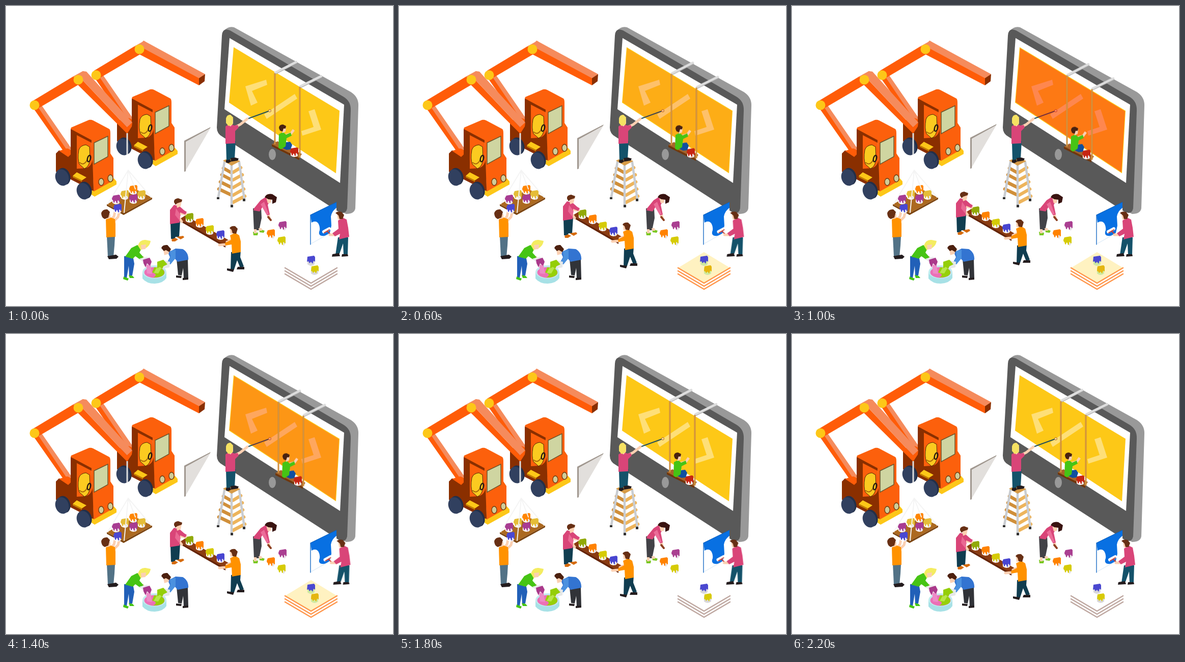
These frames come from a looping animation (760 by 590 pixels, 2400 ms). An HTML page:

```html
<!DOCTYPE html>
<html lang="en">
<head>
<meta charset="utf-8">
<title>Screen painting crew</title>
<style>
  html, body { margin: 0; width: 100%; height: 100%; overflow: hidden; background: #fff; }
  svg { display: block; width: 760px; height: 590px; }
  .o { fill: #ff5c08 } .br { fill: #8a2f00 } .sal { fill: #f58b5c } .y { fill: #fdc718 }
  .skin { fill: #fbd0b2 } .pink { fill: #d94578 } .teal { fill: #14526a } .navy { fill: #103d50 }
  .hair { fill: #672f14 } .dark { fill: #241c1e } .amber { fill: #ff9200 } .leaf { fill: #46c414 }
  .line { fill: none; stroke-linecap: round; stroke-linejoin: round }
  .arm { stroke: #fbd0b2; stroke-width: 5 }
  .lift, .swing, .panel, .roller, .tint, .on, .off { animation: 2400ms step-end infinite }
  .lift { animation-name: lift }
  .swing { animation-name: swing }
  .panel { animation-name: panel }
  .roller { animation-name: roller }
  .tint { animation-name: tint }
  .on { animation-name: on }
  .off { animation-name: off }
  @keyframes lift {
    0%, 91.66%, 100% { transform: translateY(0) }
    8.33% { transform: translateY(-2px) }
    16.66% { transform: translateY(-4px) }
    25% { transform: translateY(-7px) }
    33.33% { transform: translateY(-9px) }
    41.66% { transform: translateY(-13px) }
    58.33% { transform: translateY(-10px) }
    66.66% { transform: translateY(-8px) }
    75% { transform: translateY(-5px) }
    83.33% { transform: translateY(-3px) }
  }
  @keyframes swing {
    0%, 91.66%, 100% { transform: none }
    8.33%, 83.33% { transform: translate(2px, 0) }
    16.66%, 75% { transform: translate(4px, 0) }
    25%, 58.33% { transform: translate(7px, 1.5px) }
    33.33% { transform: translate(9px, 3px) }
    41.66% { transform: translate(12px, 4.5px) }
    66.66% { transform: translate(5px, 1px) }
  }
  @keyframes panel {
    0%, 91.66%, 100% { transform: translateY(0) }
    8.33%, 83.33% { transform: translateY(-2px) }
    16.66%, 75% { transform: translateY(-4px) }
    25%, 66.66% { transform: translateY(-5px) }
    33.33%, 41.66%, 58.33% { transform: translateY(-6px) }
  }
  @keyframes roller {
    0%, 91.66%, 100% { transform: translateX(0) }
    8.33%, 83.33% { transform: translateX(1px) }
    16.66%, 33.33%, 58.33%, 75% { transform: translateX(2.5px) }
    25%, 66.66% { transform: translateX(3.5px) }
    41.66% { transform: translateX(-3px) }
  }
  @keyframes tint {
    0%, 75%, 100% { opacity: 0 }
    25%, 66.66% { opacity: .13 }
    33.33%, 58.33% { opacity: .25 }
    41.66% { opacity: .39 }
  }
  @keyframes on { 0%, 75%, 100% { opacity: 0 } 25% { opacity: 1 } }
  @keyframes off { 0%, 75%, 100% { opacity: 1 } 25% { opacity: 0 } }
</style>
</head>
<body>
<svg viewBox="0 0 760 590">
  <defs>
    <g id="can">
      <path d="M-7-4V6Q0 12 7 6V-4Z" fill="#fff"/>
      <path d="M3-2V9Q6 8 7 6V-4Z" fill="#e9e6ea"/>
      <path d="M-6-8 6-10 8-8V3Q6 6 5 1L3 2V6Q1 9 0 3L-2 2Q-3 8-5 5L-6 1Q-8 1-8-3Z" fill="currentColor"/>
    </g>

    <g id="wheel">
      <ellipse cx="3" cy="-1" rx="12.5" ry="17" fill="#222f49" transform="rotate(-18)"/>
      <ellipse cx="-1" cy="0" rx="13" ry="16.5" fill="#31405f" transform="rotate(-18)"/>
    </g>

    <g id="truck">
      <path class="br" d="M98 290 104 284 128 292V240L168 262 172 365 160 358 98 326Z"/>
      <path class="o" d="M104 285 120 280 128 283V294L122 297Z"/>
      <path class="br" d="M98 291 104 285 122 297 128 291V340L98 324Z"/>
      <path class="y" d="M168 364 212 339 217 345V351L174 375 168 371Z"/>
      <path d="M127 242 128 239 163 224Q167 223 171 225L203 242Q205 244 205 250V290L211 299V343L172 365 168 264Z" fill="#fc600c"/>
      <path class="br" d="M127 242 168 264 168 269 139 254V330L127 328Z"/>
      <path d="M139 254 168 269 171 330 160 335 139 324Z" fill="#fc600c"/>
      <path class="br" d="M156 319Q168 316 170 302L172 364 158 351 139 338V320Z"/>
      <path d="M143 283Q146 274 157 273L164 277 165 300Q164 316 154 320L144 311Q140 301 143 283Z" fill="#fbca20" stroke="#4e2606"/>
      <path d="M145 308Q153 315 160 302" class="line" stroke="#a96b0b" stroke-width="2"/>
      <ellipse cx="163" cy="300" rx="3" ry="6.500" fill="none" stroke="#281b13" stroke-width="2.4" transform="rotate(15 163 300)"/>
      <path class="y" d="M131 334 139 327 158 337 149 343Z"/>
      <path d="M131 334 149 343V346L131 337Z" fill="#c68000"/>
      <path d="M173 269 200 256V296L173 311Z" fill="#cfd5a1" stroke="#67532c" stroke-width="1.4"/>
      <g fill="#d0cc98" stroke="#6c3d12" stroke-width="1.3">
        <ellipse cx="187" cy="346" rx="5" ry="7"/>
        <ellipse cx="205" cy="339" rx="5" ry="7"/>
      </g>
      <ellipse class="on" cx="187" cy="346" rx="5" ry="7" fill="#fff21a" stroke="#6c3d12"/>
      <use href="#wheel" x="111" y="337"/>
      <use href="#wheel" x="153" y="364"/>
    </g>

    <g id="boom">
      <path class="o" d="M53 200 61 194 120 283 116 290Z"/>
      <path class="sal" d="M61 196 67 191 129 281 120 284Z"/>
      <path class="o" d="M52 187 133 138 147 152 62 202Z"/>
      <path class="sal" d="M131 139 151 128 155 132 142 145Z"/>
    </g>

    <path id="edges" d="M548 515 599 545 650 515M548 521 599 551 650 521M548 527 599 557 650 527"/>
  </defs>

  <!-- cranes -->
  <use href="#boom" x="120.5" y="-59.5"/>
  <use href="#truck" x="120" y="-60"/>
  <path class="sal" d="M270 68 391 134 379 143 260 80Z"/>
  <path class="o" d="M262 79 379 142V156L260 94Z"/>
  <path class="br" d="M379 142 391 134 390 148 379 156Z"/>
  <use href="#boom"/>
  <use href="#truck"/>
  <path class="o" d="M142 137 238 239V251L137 151Z"/>
  <path class="sal" d="M151 128 158 129 248 229 238 239 143 138Z"/>
  <path class="o" d="M238 238 248 229 247 237 238 251Z"/>
  <g class="y">
    <circle cx="56" cy="195" r="9.500"/><circle cx="142" cy="145" r="9.500"/>
    <circle cx="177" cy="136" r="9.500"/><circle cx="262" cy="85" r="9.500"/>
  </g>

  <!-- hanging tray -->
  <path d="M238 250V292" stroke="#dedede" stroke-width="3"/>
  <path d="M198 390 254 360 287 377 231 407Z" fill="#ac6920"/>
  <path d="M198 390 231 407 287 377V380L231 411 198 393Z" fill="#7c4511"/>
  <use href="#can" x="250" y="362" color="#ff8600"/>
  <use href="#can" x="233" y="372" color="#e5bd38"/>
  <use href="#can" x="266" y="372" color="#e5bd38"/>
  <use href="#can" x="250" y="380" color="#a83c92"/>
  <use href="#can" x="216" y="381" color="#a83c92"/>
  <path class="line" d="M240 323 200 389M240 323 285 376M240 323 254 360M240 323 232 406" stroke="#f4f4f4" stroke-width="2"/>

  <!-- tray loader -->
  <path class="line arm" d="M203 424 212 414 214 405M209 426 220 415 223 402"/>
  <use href="#can" x="219" y="399" color="#4a48d2"/>
  <path d="M198 452 214 453 213 471 211 493H200Z" fill="#527286"/>
  <path class="dark" d="M199 492 216 489 221 493 217 497 202 498Z"/>
  <path class="amber" d="M196 420 203 415 214 419 215 428V454L197 455Z"/>
  <path class="skin" d="M198 411 205 409V417L199 419Z"/>
  <path class="hair" d="M187 407Q190 399 199 400L204 405 201 416 194 419Q187 416 187 407Z"/>

  <!-- loose panel -->
  <g class="panel">
    <path d="M352 266 402 239 352 325Z" fill="#e2dfdc"/>
    <path d="M350 265 402 238 400 241 353 267V325L350 326Z" fill="#a0978f"/>
  </g>

  <!-- monitor -->
  <path d="M428 49Q436 39 448 42L677 169Q693 179 692 197L686 398Q684 409 668 409L650 400Z" fill="#999"/>
  <path d="M424 58Q425 42 440 48L662 178Q678 187 677 206L670 398Q667 412 652 404L425 257Q414 251 414 239Z" fill="#595959"/>
  <path d="M439 63 664 194 656 348 429 203Z" fill="#fff"/>
  <path d="M447 81 655 206 648 329 438 190Z" fill="#fdc817"/>
  <path d="M511 145 513 155 483 167 494 190 481 196 470 158ZM567 173 572 182 512 222 507 213ZM594 207 606 203 619 243 582 255 580 246 604 238Z" fill="#fff" opacity=".42"/>
  <ellipse cx="523" cy="292" rx="7" ry="11" fill="#999"/>
  <path class="line" d="M474 222 518 206" stroke="#24515a" stroke-width="2.2"/>
  <circle cx="518" cy="206" r="2.5" fill="#f6dc9b" stroke="#b56c19"/>
  <path class="tint" d="M448 83 654 207 647 327 439 189Z" fill="#ff0010"/>

  <!-- ladder -->
  <g class="line" stroke="#d08f3a" stroke-width="6.500" stroke-linecap="butt">
    <path d="M427 319 441 327M424 332 441 341M421 346 441 356M418 360 441 371"/>
    <path d="M446 327 461 318M446 342 464 332M446 357 465 346M446 372 467 360M446 386 469 374" stroke="#edb45c"/>
  </g>
  <g class="line" stroke="#c9ccd0" stroke-width="4.500">
    <path d="M429 307 417 376M458 307 468 380M443 312V391"/>
  </g>
  <path d="M426 304 443 297 460 305 443 314Z" fill="#d79b47"/>
  <path d="M414 376h5v4h-5ZM441 391h5v5h-5ZM465 379h5v5h-5Z" fill="#333"/>

  <!-- screen painter -->
  <path class="line arm" d="M448 239 460 233 474 222"/>
  <path class="teal" d="M432 268 451 266 449 300 441 300 440 304H433Z"/>
  <path class="dark" d="M432 303 440 302 442 306 437 309 432 308ZM441 299 450 298 457 300 455 304 442 306Z"/>
  <path class="pink" d="M431 237 439 231 448 235 455 234 457 239 450 246V270L431 271Z"/>
  <path class="skin" d="M437 223 446 222V231L441 237 437 234Z"/>
  <path d="M432 221Q434 213 441 214L446 219 445 233 437 236 432 230Z" fill="#f5e162"/>

  <!-- swing -->
  <g class="swing">
    <path class="line" d="M529 132.500 570 111.500M578 159.500 619 139.500" stroke="#a9a9a9" stroke-width="4"/>
    <path class="line" d="M529 131 570 110M578 158 619 138" stroke="#dedede" stroke-width="4.500"/>
    <path d="M522 272 533 266 581 291 576 299Z" fill="#a7652a"/>
    <path d="M522 272 576 299V303L522 276Z" fill="#713508"/>
    <path d="M528 132V272M577 159V298" stroke="#c78436" stroke-width="3"/>
    <path d="M528 132V272M577 159V298" stroke="#e0a54a"/>
    <path class="skin" d="M548 252 558 249 563 242 567 245 561 253 549 257Z"/>
    <path d="M538 277 549 268 558 267 562 273 559 282 551 283Z" fill="#1150a0"/>
    <path class="leaf" d="M536 252 544 248 550 253 559 249 561 255 551 260 549 276 540 282 535 279Z"/>
    <path class="skin" d="M541 240 550 239 549 247 543 250Z"/>
    <path d="M536 240Q536 233 544 233L550 236 549 241 545 241 543 247 538 245Z" fill="#492211"/>
    <use href="#can" x="566" y="288" color="#c62512"/>
  </g>

  <!-- plank carriers -->
  <g class="lift">
    <path d="M341 419 352 412 440 462 431 472Z" fill="#8b3c12"/>
    <path d="M341 419 431 471V475L341 423Z" fill="#642305"/>
    <use href="#can" x="360" y="417" color="#91a907"/>
    <use href="#can" x="380" y="427" color="#ff8200"/>
    <use href="#can" x="400" y="441" color="#d6cb06"/>
    <use href="#can" x="421" y="451" color="#4845d0"/>
    <path class="navy" d="M323 425 342 423 340 454H333L331 458H324Z"/>
    <path d="M325 459 332 456 338 459 332 463H326ZM335 454 348 452 350 455 343 459Z" fill="#d66b0d"/>
    <path class="line arm" d="M340 407 353 409M337 413 345 424"/>
    <path class="pink" d="M322 401 330 391 341 394 350 402 355 405 352 410 342 406 341 426 322 429Z"/>
    <path d="M334 398 343 411 340 421 332 411Z" fill="#e96893"/>
    <path class="skin" d="M334 386 345 384 343 394 336 397Z"/>
    <path class="hair" d="M330 386Q329 379 338 378L346 381 345 385 336 388 333 391Z"/>
    <path class="line arm" d="M444 463 431 469 419 470M447 458 434 464"/>
    <path class="navy" d="M442 484 461 481 460 494 467 512 460 515 454 500 448 518 441 520Z"/>
    <path class="dark" d="M434 516 448 518 446 523 434 520ZM455 513 468 513 468 518 453 518Z"/>
    <path class="amber" d="M440 451 450 446 458 451 461 463V484L444 487 443 469 431 471 430 466 442 460Z"/>
    <path class="skin" d="M440 438 447 438 446 447 441 448Z"/>
    <path class="hair" d="M439 437Q442 432 450 433L455 438 452 448 445 447 443 440Z"/>
  </g>

  <!-- paint mixers -->
  <path d="M232 492 249 491 252 507 248 530 242 532 241 511 237 535 232 534Z" fill="#2160b8"/>
  <path class="leaf" d="M231 532 241 536 239 540 230 537ZM241 529 249 531 252 535 243 535Z"/>
  <path class="skin" d="M258 493 270 492 274 500 269 503Z"/>
  <path class="leaf" d="M234 493 246 476 258 470 266 477 262 485 270 494 264 499 254 492 249 497Z"/>
  <path d="M259 471Q263 459 274 460L284 462Q283 471 275 476L268 473 265 481Z" fill="#f4ec61"/>
  <path class="skin" d="M265 470 275 469 274 478 266 479Z"/>
  <path d="M335 498 357 498 358 535 349 536 348 515 345 530 338 529Z" fill="#313338"/>
  <path class="dark" d="M334 530 345 531 344 535 334 534ZM347 535 358 534V538L347 539Z"/>
  <path d="M318 485 333 477 347 478Q359 485 358 499L337 503 331 496 323 508 316 505 322 494Z" fill="#3374d1"/>
  <path d="M322 482 333 479 333 496 323 508 317 505 323 494Z" fill="#4b91df"/>
  <path class="skin" d="M309 479 319 479 320 487 311 490Z"/>
  <path d="M305 476Q307 469 317 470L324 478 321 484 314 480 310 482Z" fill="#4c200e"/>
  <path d="M268 523V536Q276 546 292 546 309 545 315 535V523Z" fill="#a7e1e6"/>
  <ellipse cx="291.500" cy="523" rx="23.500" ry="13" fill="#c1ecef"/>
  <ellipse cx="291.500" cy="524" rx="20" ry="10.500" fill="#ec70b6"/>
  <path d="M291 514Q311 514 311 525 309 534 289 534Q300 528 287 524Z" fill="#96d008"/>
  <path d="M275 507 284 510 287 527 277 526Z" fill="#ed8bc7"/>
  <path d="M299 509 306 514 299 526 290 525Z" fill="#b8e64b"/>
  <path d="M262 497 277 493 286 501 276 510Z" fill="#ebe9ee"/>
  <path d="M269 499 282 495 286 503 283 511 277 506 274 514 270 506Z" fill="#aa398b"/>
  <path d="M308 500 322 503 321 514 307 517Z" fill="#e6e8e8"/>
  <path d="M297 503 309 499 317 508 309 512 307 517 302 513 297 516Z" fill="#94ce08"/>

  <!-- brush holder -->
  <path d="M485 398 501 397 502 417 497 441H487Z" fill="#424247"/>
  <path d="M485 444 495 446 494 451 486 451ZM497 438 508 442 506 446 498 445Z" fill="#79c720"/>
  <path class="skin" d="M487 439 492 439V447H487ZM496 437 502 437 503 442 497 442Z"/>
  <path class="line arm" d="M510 396 514 406 517 416" stroke-width="4"/>
  <path class="pink" d="M487 398 500 382 511 375 519 383 514 391 518 410 513 412 504 395 498 404 486 402Z"/>
  <path d="M500 390 507 385 516 409 512 411Z" fill="#eb6d99"/>
  <path class="skin" d="M511 377 522 378 520 387 514 388Z"/>
  <path d="M508 376Q512 368 523 370L532 376 530 386 523 389 523 381 515 380Z" fill="#391310"/>
  <path class="line" d="M515 415 520 421" stroke="#8c4021" stroke-width="4"/>
  <use href="#can" x="543" y="433" color="#aa3f91"/>
  <use href="#can" x="520" y="449" color="#ff8200"/>
  <use href="#can" x="541" y="463" color="#d6cb06"/>

  <!-- blue board -->
  <path d="M598 411 649 386V441L598 469Z" fill="#fff"/>
  <path d="M598 411 649 386V397Q640 403 638 414L639 432 636 446Q627 455 617 451 613 448 616 441 617 434 613 427 608 421 600 426Z" fill="#0870e2"/>
  <path class="line" d="M649 386 598 411V469" stroke="#0860c0" stroke-width="1.300"/>
  <path class="line" d="M600 467 634 448" stroke="#d4e6f6"/>
  <g class="roller">
    <path class="line" d="M624 444 635 438" stroke="#fff" stroke-width="6"/>
    <path class="line" d="M625 446 635 440M631 443 637 449" stroke="#c63e34" stroke-width="2"/>
    <path class="line arm" d="M636 450 646 450 658 440" stroke-width="4"/>
    <path class="teal" d="M652 455 672 455 671 489 663 490 662 467 655 487 647 489Z"/>
    <path class="dark" d="M641 488 654 486 656 492 640 493ZM660 488 671 488 672 492 659 493Z"/>
    <path class="pink" d="M652 422 661 416 669 420 672 436 674 454 654 459 656 448 646 453 641 447 653 438Z"/>
    <path class="skin" d="M650 411 658 410 660 419 652 420Z"/>
    <path class="hair" d="M647 407Q651 403 659 405L664 411 661 419 655 419 653 412Z"/>
  </g>

  <!-- sheets -->
  <use class="off line" href="#edges" stroke="#bea7a0" stroke-width="2.600"/>
  <g class="on">
    <path d="M548 515 599 484 650 515 599 545Z" fill="#fff2c1"/>
    <use class="line" href="#edges" stroke="#ff964b" stroke-width="2.600"/>
  </g>
  <path d="M592 497H606V508Q599 514 592 508ZM599 515H613V526Q606 532 599 526Z" fill="#d9d8db"/>
  <path class="on" d="M592 497H606V508Q599 514 592 508ZM599 515H613V526Q606 532 599 526Z" fill="#cfeaa0"/>
  <path d="M592 493 605 491 607 494V503L604 501 602 507 599 503 596 506 594 502 591 503Z" fill="#4a48d0"/>
  <path d="M600 512 612 510 614 513V522L611 520 609 526 606 522 603 525 601 521 599 522Z" fill="#d8ca06"/>
  <path class="on" d="M600 512 612 510 614 513V522L611 520 609 526 606 522 603 525 601 521 599 522Z" fill="#e5b610"/>
</svg>
</body>
</html>
```
